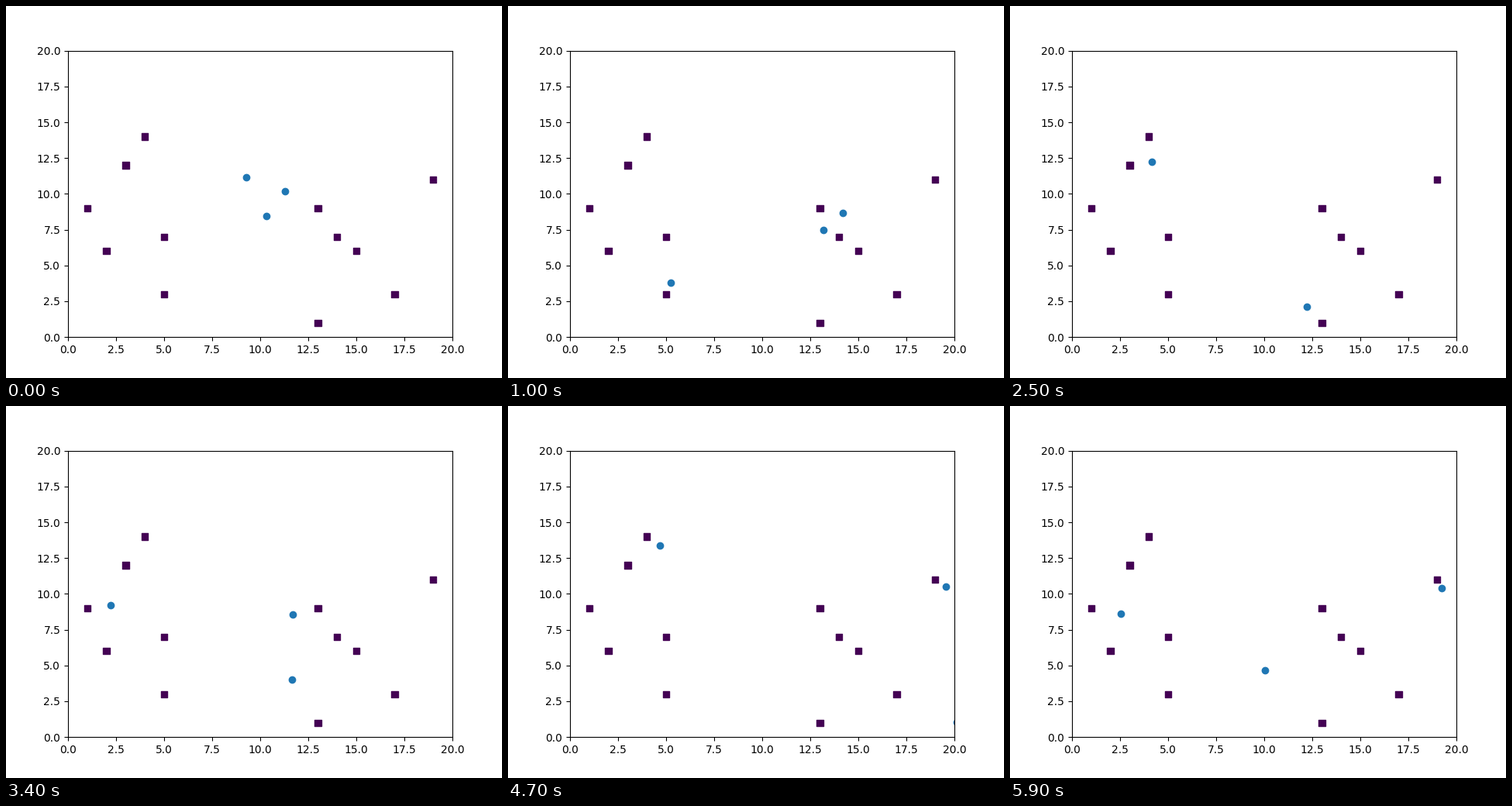
These frames come from a looping animation (640x480 px, 6000 ms). A matplotlib script:

```python
import numpy as np
import matplotlib.pyplot as plt
from matplotlib.animation import FuncAnimation

FRAMES, INTERVAL = 60, 100

SITES = np.array([
    (5, 3), (2, 6), (5, 7), (1, 9), (3, 12), (4, 14),
    (13, 1), (17, 3), (15, 6), (14, 7), (13, 9), (19, 11),
])

# Turning points of each agent, keyed by step; it flies straight in between
WEST = {
    0: (10.32, 8.45), 8: (5.35, 2.34), 10: (5.24, 3.8), 18: (2.3, 7.7),
    25: (4.15, 12.23), 34: (2.22, 9.2), 42: (4.4, 13.3), 47: (4.68, 13.37),
    54: (4.25, 13.1), 59: (2.54, 8.6),
}
SOUTH = {
    0: (9.27, 11.16), 10: (13.19, 7.48), 18: (16.41, 4.34), 20: (16.9, 2.83),
    25: (12.22, 2.12), 34: (11.65, 4.02), 42: (17.18, 2.88),
    47: (20.13, 1.04), 49: (19.27, 1.1), 59: (10.05, 4.65),
}
EAST = {
    0: (11.29, 10.18), 10: (14.19, 8.67), 18: (20.16, 10.65),
    22: (23.1, 11.1), 34: (11.7, 8.56), 47: (19.56, 10.5),
    52: (18.9, 10.3), 57: (19.9, 10.5), 59: (19.24, 10.38),
}


def fly(turns, step):
    """Position on the straight leg that is being flown at this step."""
    return [np.interp(step, list(turns), axis) for axis in zip(*turns.values())]


def positions(step):
    return [fly(turns, step) for turns in (WEST, SOUTH, EAST)]


fig, ax = plt.subplots(figsize=(6.4, 4.8), dpi=100)
ax.set(xlim=(0, 20), ylim=(0, 20))
# Colour-mapped values, all at the low end of viridis
ax.scatter(*SITES.T, marker="s", c=np.zeros(len(SITES)), cmap="viridis")
agents = ax.scatter(*zip(*positions(0)), color="#1f77b4")


def update(step):
    agents.set_offsets(positions(step))
    return (agents,)


anim = FuncAnimation(fig, update, frames=FRAMES, interval=INTERVAL,
                     repeat=True, repeat_delay=0)
plt.show()
```
